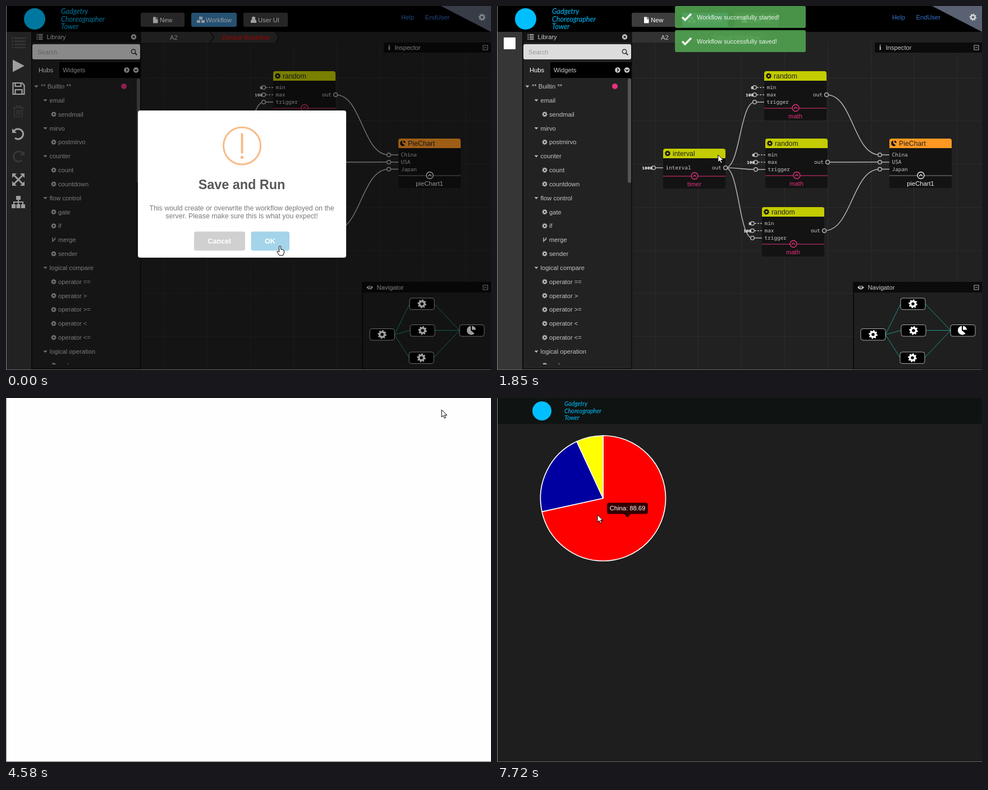
Write an HTML page with a canvas that moves like this. It is 864 px wide and 648 px high and loops after 7990 ms.

```html
<!DOCTYPE html>
<html lang="en">
<head>
<meta charset="utf-8">
<title>Workflow editor</title>
<style>
html, body { margin: 0; height: 100%; overflow: hidden; background: #212121; }
canvas { display: block; }
</style>
</head>
<body>
<canvas id="stage" width="864" height="648"></canvas>
<script>
const ctx = document.getElementById('stage').getContext('2d');
const LOOP = 7990, TAU = Math.PI * 2;
const SANS = '"Liberation Sans", Arial, sans-serif';
const MONO = '"Noto Sans Mono", monospace';
const BLUE = '#00bfff', PINK = '#e6317c', LIME = '#c3cc00', OFF = '#585858', WIRE = '#b4b4b4';

const progress = (t, a, b) => Math.min(1, Math.max(0, (t - a) / (b - a)));
const swing = p => 0.5 - Math.cos(p * Math.PI) / 2;
const mix = (a, b, p) => a + (b - a) * p;

function rect(x, y, w, h, color, r = 0, border) {
  ctx.beginPath();
  ctx.roundRect(x, y, w, h, r);
  ctx.fillStyle = color;
  ctx.fill();
  if (border) { ctx.strokeStyle = border; ctx.lineWidth = 1; ctx.stroke(); }
}
function text(s, x, y, color = '#ccc', size = 11.2, { style = '', face = SANS, align = 'left' } = {}) {
  ctx.font = `${style} ${size}px ${face}`;
  ctx.textAlign = align;
  ctx.fillStyle = color;
  ctx.fillText(s, x, y + size * 0.36);
}
function disc(x, y, r, color) {
  ctx.beginPath();
  ctx.arc(x, y, r, 0, TAU);
  ctx.fillStyle = color;
  ctx.fill();
}
function ring(x, y, r, color, width = 1.4, fill) {
  if (fill) disc(x, y, r, fill);
  ctx.beginPath();
  ctx.arc(x, y, r, 0, TAU);
  ctx.strokeStyle = color;
  ctx.lineWidth = width;
  ctx.stroke();
}
// Strokes or fills SVG path data with its origin at x, y
function shape(d, x, y, { fill, stroke, width = 1.4 }) {
  const p = new Path2D(d);
  ctx.save();
  ctx.translate(x, y);
  if (fill) { ctx.fillStyle = fill; ctx.fill(p, 'evenodd'); }
  if (stroke) { ctx.strokeStyle = stroke; ctx.lineWidth = width; ctx.stroke(p); }
  ctx.restore();
}
function gear(x, y, r, color) {
  ctx.beginPath();
  for (let i = 0; i < 32; i++) {
    const a = (i + 0.5) / 32 * TAU, q = i % 4 < 2 ? r : r * 0.76;
    ctx.lineTo(x + q * Math.cos(a), y + q * Math.sin(a));
  }
  ctx.closePath();
  ctx.moveTo(x + r * 0.34, y);
  ctx.arc(x, y, r * 0.34, 0, TAU);
  ctx.fillStyle = color;
  ctx.fill('evenodd');
}
function pieIcon(x, y, r, color) {
  shape(`M-1 0V${-r}A${r} ${r} 0 1 0 ${r * 0.7} ${r * 0.7}ZM1 -1V${-r}A${r} ${r} 0 0 1 ${r} -1Z`, x, y, { fill: color });
}
const minimise = (x, y) => shape('M-4 -4H4V4H-4ZM-2 0H2', x, y, { stroke: '#aaa', width: 1.1 });

function brand(x, r, textX, size, step) {
  disc(x, 23, r, BLUE);
  ['Gadgetry', 'Choreographer', 'Tower'].forEach((s, i) =>
    text(s, textX, 23 + (i - 1) * step, BLUE, size, { style: 'italic', face: 'Lato, sans-serif' }));
}

function header(t) {
  rect(0, 0, 864, 46, '#000');
  brand(51, 19, 98, 12.6, 13.6);
  rect(240, 12, 78, 25, '#3d3d3d', 3);
  rect(330, 12, 81, 25, '#3b82b8', 3);
  rect(423, 12, 79, 25, '#3d3d3d', 3);
  shape('M-4 -5.500H1V-1.500H4.500V5.500H-4ZM2 -5.500L4.500 -2.500H2Z', 266, 25, { fill: '#fff' });
  shape('M-3 -6H3V-1H-3ZM-7 0H-1V5H-7ZM1 0H7V5H1Z', 347, 25, { fill: '#e8f2f8' });
  disc(441, 22, 3.2, '#fff');
  shape('M-5 5Q-6 -1 -2 -1H2Q6 -1 5 5Z', 441, 25, { fill: '#fff' });
  text('New', 274, 25, '#fff');
  text('Workflow', 356, 25, '#fff');
  text('User UI', 449, 25, '#fff');
  const hover = t > 4100 && t < 4580;
  text('Help', 704, 20, '#3673cc');
  text('EndUser', 746.5, 20, hover ? '#28568f' : '#3673cc');
  if (hover) rect(747, 25, 42, 1, '#28568f');
  shape('M775 0H864V46Z', 0, 0, { fill: '#596173' });
  gear(848, 20, 6.5, '#d0d0d0');
}

function toolbar(t) {
  rect(0, 46, 46, 602, '#363636');
  rect(45, 46, 1.5, 602, '#0c0c0c');
  if (t >= 1050) return rect(12, 56, 21, 21, '#fff', 1);
  const saveColor = t < 600 ? '#fff' : OFF;
  for (let i = 0; i < 4; i++) {
    rect(10, 56 + i * 5.6, 3, 2.4, OFF);
    rect(15, 56 + i * 5.6, 20, 2.4, OFF);
  }
  shape('M-10 -11L11 0L-10 11Z', 22, 106.5, { fill: '#fff' });
  shape('M-10 -10H6L10 -6V10H-10ZM-6 -10V-4H4V-10M-6 10V2H6V10', 22.5, 147, { stroke: saveColor, width: 2.2 });
  shape('M-10 -7H10M-4 -7V-10H4V-7M-7 -7V9H7V-7M-3 -3V6M0 -3V6M3 -3V6', 22, 188, { stroke: OFF, width: 1.6 });
  const turn = 'M-8 -5A9 9 0 1 1 -6 7';
  const tip = 'M-11 -10V-2H-3Z';
  shape(turn, 22, 228, { stroke: '#fff', width: 3 });
  shape(tip, 22, 228, { fill: '#fff' });
  ctx.save();
  ctx.translate(22, 268);
  ctx.scale(-1, 1);
  shape(turn, 0, 0, { stroke: OFF, width: 3 });
  shape(tip, 0, 0, { fill: OFF });
  ctx.restore();
  shape('M-8 -8L8 8M8 -8L-8 8', 22, 309, { stroke: '#fff', width: 3 });
  shape('M-11 -11H-3L-11 -3ZM11 -11V-3L3 -11ZM-11 11V3L-3 11ZM11 11H3L11 3Z', 22, 309, { fill: '#fff' });
  shape('M0 -6V5M-8 5V0H8V5', 22, 349, { stroke: '#fff', width: 2 });
  shape('M-4 -11H4V-4H-4ZM-12 4H-5V11H-12ZM-3.500 4H3.500V11H-3.500ZM5 4H12V11H5Z', 22, 349, { fill: '#fff' });
}

const TREE = ['** Builtin **', ' email', '  sendmail', ' mirvo', '  postmirvo', ' counter', '  count', '  countdown',
  ' flow control', '  gate', '  if', '  merge', '  sender', ' logical compare', '  operator ==', '  operator >',
  '  operator >=', '  operator <', '  operator <=', ' logical operation', '  and'];

function library() {
  rect(47, 46, 193, 602, '#222');
  rect(47, 46, 193, 19, '#141414');
  for (let i = 0; i < 4; i++) shape('M0 0H2M3.500 0H11', 54.5, 51 + i * 2.8, { stroke: '#ccc', width: 1.3 });
  text('Library', 72.5, 55);
  disc(227.5, 55, 4.7, '#ccc');
  shape('M-2 -2L2 2M2 -2L-2 2', 227.5, 55, { stroke: '#141414', width: 1.3 });
  rect(47, 68, 192, 27, '#dcdcdc', 3);
  text('Search', 56, 82, '#999');
  ring(227, 81, 3.7, '#333', 1.5);
  shape('M0 0L3.500 3.500', 229.7, 83.7, { stroke: '#333', width: 2 });
  rect(47, 100, 193, 28, '#000');
  rect(47, 100, 48, 28, '#222');
  text('Hubs', 58, 114, '#fff');
  text('Widgets', 101, 114);
  disc(215, 114, 4.8, '#ccc');
  disc(231.5, 114, 4.8, '#ccc');
  shape('M-1 -2.500L1.500 0L-1 2.500', 215, 114, { stroke: '#000' });
  shape('M-2.500 -1L0 1.500L2.500 -1', 231.5, 114, { stroke: '#000' });
  ctx.save();
  ctx.beginPath();
  ctx.rect(47, 128, 193, 510);
  ctx.clip();
  TREE.forEach((row, i) => {
    const label = row.trimStart(), level = label === row ? 0 : row.search(/\S/), y = 143 + i * 24.84;
    if (level < 2) shape('M-3.500 -1.500H3.500L0 2.200Z', 54 + level * 16, y, { fill: '#bbb' });
    else if (label === 'merge') shape('M-2 -4V4M2.500 -4V-2Q2 0 -2 1.500', 85, y, { stroke: '#bbb' });
    else gear(85, y, 4.8, '#bbb');
    text(label, [62, 77.5, 93][level], y, '#c4c4c4');
  });
  ctx.restore();
  disc(210, 143, 5, PINK);
  rect(233, 129, 6, 186, '#555', 3);
  rect(46, 645.5, 194, 1.5, '#0c0c0c');
  rect(239, 46, 1.5, 602, '#0c0c0c');
}

function grid() {
  rect(240, 46, 624, 602, '#212121');
  ctx.strokeStyle = '#404040';
  ctx.lineWidth = 1;
  ctx.setLineDash([1, 2]);
  ctx.beginPath();
  for (let i = 0; i < 8; i++) {
    const x = Math.round(281 + i * 76.9) + 0.5, y = Math.round(51 + i * 76.7) + 0.5;
    ctx.moveTo(x, 66); ctx.lineTo(x, 648);
    if (i) { ctx.moveTo(240, y); ctx.lineTo(864, y); }
  }
  ctx.stroke();
  ctx.setLineDash([]);
}

function tabs(t) {
  shape('M240 46H480L486 56L480 65H240Z', 0, 0, { fill: '#323232' });
  shape('M364 46L370 56L364 65M480 46L486 56L480 65', 0, 0, { stroke: '#0c0c0c' });
  text('A2', 292, 56);
  if (t < 600) text('Default Workflow', 385, 56, 'red', 11.2, { style: 'italic' });
  else text('Default Workflow', 385, 56);
}

function wire(x1, y1, x2, y2) {
  const m = (x1 + x2) / 2;
  shape(`M${x1} ${y1}C${m} ${y1} ${m} ${y2} ${x2} ${y2}`, 0, 0, { stroke: WIRE, width: 1.5 });
}
// inputs: [label, y offset, constant value]; a dashed stub marks an optional constant
function node({ x, y, title, height, inputs, out, footer, color = LIME, accent = PINK, hot }) {
  rect(x, y, 111, height, '#131313', 4);
  rect(x, y, 111, 17, color, [4, 4, 0, 0]);
  if (accent === PINK) gear(x + 8, y + 8.5, 5.3, '#111');
  else pieIcon(x + 8, y + 8.5, 5, '#111');
  text(title, x + 17, y + 8.5, '#222', 12.3);
  for (const [label, dy, value] of inputs) {
    const py = y + dy;
    if (value && value !== '1000') ctx.setLineDash([3, 2]);
    shape('M-13 0H0', x, py, { stroke: WIRE, width: 1.5 });
    ctx.setLineDash([]);
    ring(x - 17, py, 3.3, WIRE, 1.5, '#212121');
    if (value) text(value, x - 19, py, '#fff', 7.8, { style: 'bold', face: MONO, align: 'right' });
    text(label, x + 4.5, py, hot && label === 'trigger' ? '#fff' : '#c8c8c8', 9.4, { face: MONO });
  }
  if (out) {
    text('out', x + 104, y + out, '#c8c8c8', 9.4, { face: MONO, align: 'right' });
    ring(x + 111, y + out, 3.5, WIRE, 1.5, '#212121');
  }
  const line = y + height - 22.5, light = accent === PINK ? PINK : '#eee';
  rect(x, line, 111, 1, accent);
  ring(x + 56, line, 6, light, 1.4, '#131313');
  shape('M-3 1.500L0 -1.500L3 1.500', x + 56, line, { stroke: light });
  text(footer, x + 55.5, y + height - 8.500, light, 11.2, { align: 'center' });
}

const RANDOMS = [[476, 116], [478, 236], [472, 358]];
function graph(t) {
  RANDOMS.forEach(([x, y], i) => {
    wire(407, 288, x - 17, y + 55);
    wire(x + 111, y + 42, 682, 265 + i * 12.8);
  });
  node({ x: 296, y: 254, title: 'interval', height: 71, inputs: [['interval', 34, '1000']], out: 34, footer: 'timer' });
  RANDOMS.forEach(([x, y], i) => node({
    x, y, title: 'random', height: 88, out: 42, footer: 'math', hot: i === 2 && t >= 1270 && t < 1700,
    inputs: [['min', 29, '0'], ['max', 42, '100'], ['trigger', 55]]
  }));
  node({
    x: 699, y: 236, title: 'PieChart', height: 88, footer: 'pieChart1', color: '#ff9822', accent: '#888',
    inputs: [['China', 29], ['USA', 42], ['Japan', 54.5]]
  });
}

function sidePanels() {
  rect(673, 65, 191, 18, '#0b0b0b');
  text('i', 681, 74, '#ddd', 12, { style: 'bold', face: '"Liberation Serif", serif' });
  text('Inspector', 692.5, 74);
  minimise(854, 74);
  rect(634, 491, 230, 157, '#0b0b0b');
  rect(636, 510, 228, 136, '#1f1f1f');
  shape('M-6 0Q0 -7 6 0Q0 7 -6 0Z', 648, 501, { fill: '#ccc' });
  ring(648, 500.5, 1.8, '#0b0b0b', 1.3);
  text('Navigator', 660.5, 501);
  minimise(854, 501);
  for (const [x, y] of [[719, 530.5], [720, 577.5], [718, 626]]) {
    shape(`M692 585L${x} ${y}M${x + 44} ${y}L808 577.500`, 0, 0, { stroke: '#1b9488', width: 1 });
  }
  for (const [x, y] of [[648, 574.5], [719, 520], [720, 567.5], [718, 616], [808, 567.5]]) {
    rect(x, y, 44, 20.5, '#000', 4, '#aaa');
    if (x > 800) pieIcon(x + 21, y + 10, 8, '#fff');
    else gear(x + 22, y + 10.2, 8, '#fff');
  }
}

function dialog(t) {
  const p = progress(t, 150, 420);
  if (p === 1) return;
  ctx.globalAlpha = 1 - p;
  rect(0, 0, 864, 648, 'rgba(0,0,0,.38)');
  ctx.save();
  ctx.translate(420.5, 317);
  ctx.scale(1 - p / 2, 1 - p / 2);
  ctx.translate(-420.5, -317);
  rect(235, 186, 371, 262, '#fff', 4);
  ring(420.5, 249, 33, '#f8bb86', 3);
  rect(418.5, 226, 4, 37, '#f8bb86', 2);
  disc(420.5, 269.5, 2.8, '#f8bb86');
  const center = { align: 'center' }, bold = { align: 'center', style: 'bold' };
  text('Save and Run', 420, 318, '#575757', 23.4, bold);
  text('This would create or overwrite the workflow deployed on the', 420, 359.5, '#797979', 12.4, center);
  text('server. Please make sure this is what you expect!', 420, 373.5, '#797979', 12.4, center);
  rect(335, 401.5, 91, 34, '#d0d0d0', 4);
  rect(436.5, 401.5, 68.5, 34, '#a4d4ea', 4);
  text('Cancel', 380, 418, '#fff', 12.6, bold);
  text('OK', 470.5, 418, '#fff', 12.6, bold);
  ctx.restore();
  ctx.globalAlpha = 1;
}

function toast(label, y, alpha) {
  if (alpha <= 0) return;
  ctx.globalAlpha = alpha * 0.9;
  rect(317, y, 233, 39, '#51a351', 3);
  shape('M-8 0L-3 5L8 -6', 338, y + 20, { stroke: '#fff', width: 3.6 });
  text(label, 356, y + 20, '#fff', 11);
  ctx.globalAlpha = 1;
}
const fade = (t, showAt, hideAt) => swing(progress(t, showAt, showAt + 300)) - swing(progress(t, hideAt, hideAt + 390));

function editor(t) {
  grid();
  tabs(t);
  graph(t);
  sidePanels();
  header(t);
  toolbar(t);
  library();
  dialog(t);
  toast('Workflow successfully saved!', t < 970 ? 0 : 43, fade(t, 670, 4060));
  toast('Workflow successfully started!', 0, fade(t, 900, 4200));
  if (t >= 4310) {
    rect(0, 628, 287, 20, '#d2d2d2', [0, 3, 0, 0]);
    text('10.239.10.33:3000', 2, 638, '#777');
  }
}

function chartPage(t) {
  rect(0, 0, 864, 648, '#1e1e1e');
  rect(0, 0, 864, 46, '#0f1312');
  brand(80, 17, 120, 10.7, 12.5);
  const p = swing(progress(t, 7400, 7720));
  const stops = [0, mix(0.376, 0.7156, p), mix(0.898, 0.931, p), 1];
  const cx = 189, cy = 178.5, r = 111.5;
  ['red', '#0000a0', '#ff0'].forEach((color, i) => {
    ctx.beginPath();
    ctx.moveTo(cx, cy);
    ctx.arc(cx, cy, r, (stops[i] - 0.25) * TAU, (stops[i + 1] - 0.25) * TAU);
    ctx.closePath();
    ctx.fillStyle = color;
    ctx.fill();
    ctx.strokeStyle = '#fff';
    ctx.lineWidth = 1.7;
    ctx.lineJoin = 'bevel';
    ctx.stroke();
    ctx.lineJoin = 'miter';
  });
  if (t < 6850) return;
  const a = stops[1] / 2 * TAU, x = cx + r / 2 * Math.sin(a), y = cy - r / 2 * Math.cos(a) - 1;
  shape('M-32.500 -26H32.500Q36.500 -26 36.500 -22V-10Q36.500 -6 32.500 -6H6L0 0L-6 -6H-32.500Q-36.500 -6 -36.500 -10V-22Q-36.500 -26 -32.500 -26Z',
    x, y, { fill: 'rgba(0,0,0,.8)' });
  text(t < 7480 ? 'China: 61.37' : 'China: 88.69', x, y - 16, '#fff', 11.2, { align: 'center' });
}

const POINTER = [[0, 488, 427], [250, 488, 427], [820, 482, 416], [1570, 482, 416], [2000, 347, 185], [3090, 347, 185],
  [3220, 371, 165], [4160, 776, 21], [4980, 776, 21], [6050, 409, 650], [6320, 374, 257], [6640, 374, 257],
  [6920, 255, 127], [7350, 255, 127], [7720, 179, 208], [LOOP, 179, 208]];

function pointer(t) {
  if (t >= 6050 && t < 6320) return;
  const i = POINTER.findIndex(k => k[0] > t), [t0, x0, y0] = POINTER[i - 1], [t1, x1, y1] = POINTER[i];
  const p = (t - t0) / (t1 - t0), hand = t < 400 || (t > 4100 && t < 4580);
  shape(hand
    ? 'M-1.500 1Q0 -1 1.500 1V6L5.500 7Q7.500 7.500 7.500 10V12L5.500 17H-1L-5 11Q-5.500 9 -3.500 9.500L-1.500 11Z'
    : 'M0 0V13L3 10.200L5.200 15L7.400 14L5.200 9.500H9.500Z',
  mix(x0, x1, p), mix(y0, y1, p), { fill: '#fff', stroke: '#000', width: 1 });
}

function draw(now) {
  const t = now % LOOP;
  if (t < 4580) editor(t);
  else if (t < 6320) rect(0, 0, 864, 648, '#fefefe');
  else chartPage(t);
  pointer(t);
  rect(0, 0, 1, 648, '#888');
  rect(0, 647, 864, 1, '#666');
  requestAnimationFrame(draw);
}
const start = performance.now();
requestAnimationFrame(function first() { draw(0); });
draw = (render => () => render(performance.now() - start))(draw);
</script>
</body>
</html>
```
